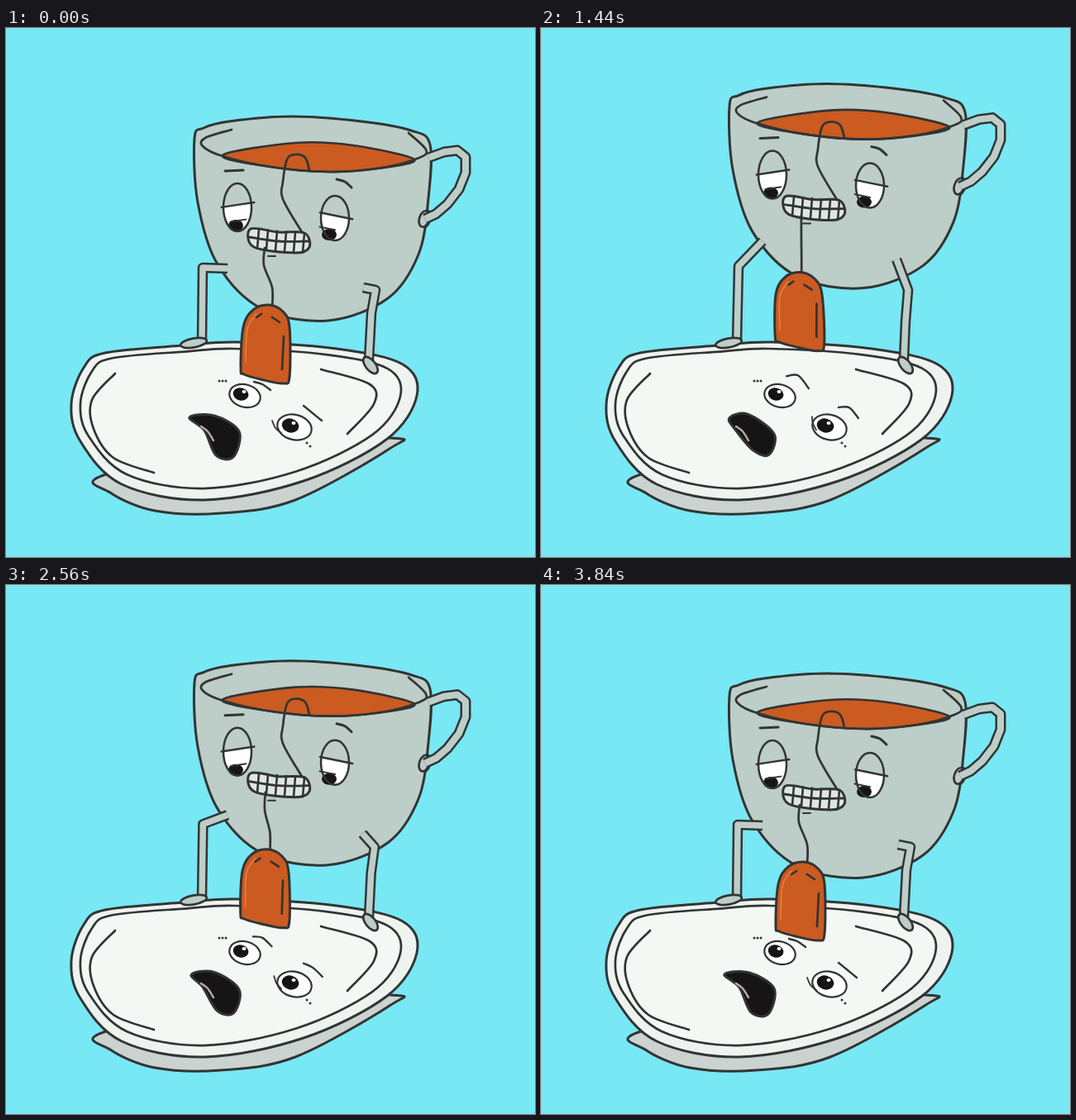
An HTML page with a canvas that plays this animation: 640 px wide and 640 px high, repeating every 3880 ms.

```html
<!DOCTYPE html>
<html lang="en">
<head>
<meta charset="utf-8">
<title>Tea time</title>
<style>
  html, body { margin: 0; width: 100%; height: 100%; overflow: hidden; background: #78e8f4; }
  canvas { display: block; width: 100vmin; height: 100vmin; }
</style>
</head>
<body>
<canvas id="stage" width="640" height="640"></canvas>
<script>
const ctx = document.getElementById('stage').getContext('2d');
const LOOP = 3880, STEP = 40, FALL_AT = 1960, TRAVEL = 1920, HEIGHT = 40.5;
const SKY = '#78e8f4', INK = '#323434', CUP = '#bdcdc7', TEA = '#cb5b20',
      CHINA = '#f4f8f5', SIDE = '#cbd3d0', BLACK = '#161415';

let lift = 0; // 0 = dipped, 1 = raised

const parse = s => s.split(' ').map(p => p.split(',').map(Number));
const mix = (a, b) => a + (b - a) * lift;

// Blend the key points of a dipped and a raised shape.
const pose = (low, high) => {
  const top = parse(high);
  return parse(low).map(([x, y], i) => [mix(x, top[i][0]), mix(y, top[i][1])]);
};

// Smooth curve through a few key points.
function trace(shape, closed) {
  const p = typeof shape === 'string' ? parse(shape) : shape, n = p.length;
  const at = i => closed ? p[(i + n) % n] : p[Math.max(0, Math.min(n - 1, i))];
  ctx.beginPath();
  ctx.moveTo(...p[0]);
  for (let i = 0; i < (closed ? n : n - 1); i++) {
    const [a, b, c, d] = [at(i - 1), at(i), at(i + 1), at(i + 2)];
    ctx.bezierCurveTo(b[0] + (c[0] - a[0]) / 6, b[1] + (c[1] - a[1]) / 6,
                      c[0] - (d[0] - b[0]) / 6, c[1] - (d[1] - b[1]) / 6, ...c);
  }
  if (closed) ctx.closePath();
}

function paint(fill, width = 3, color = INK) {
  ctx.fillStyle = fill;
  ctx.fill();
  if (width) ink(width, color);
}

function ink(width = 2.7, color = INK) {
  ctx.lineWidth = width;
  ctx.strokeStyle = color;
  ctx.stroke();
}

function line(shape, width, color) {
  trace(shape);
  ink(width, color);
}

function blob(shape, fill, width) {
  trace(shape, true);
  paint(fill, width);
}

function oval(x, y, rx, ry, fill, turn = 0, width = 0) {
  ctx.beginPath();
  ctx.ellipse(x, y, rx, ry, turn, 0, Math.PI * 2);
  paint(fill, width);
}

// Outlined limb with open ends.
function tube(points, width) {
  ctx.beginPath();
  points.forEach(p => ctx.lineTo(...p));
  ctx.lineCap = 'butt';
  ink(width + 5);
  ink(width, CUP);
  ctx.lineCap = 'round';
}

function saucer() {
  blob('118,541 126,562 180,584 260,587 350,571 464,509 465,496 300,500', SIDE);
  const rim = parse('79,455 94,411 120,393 215,384 280,380 400,388 480,407 497,445 460,498 360,548 240,571 140,552 90,500');
  blob(rim, '#eef3f0');
  blob(rim.map(([x, y]) => [90 + (x - 79) * .926, 388 + (y - 380) * .885]), CHINA, 2.7);
  line('132,418 104,450 106,485 130,520 179,538');
  line('381,413 440,431 445,455 413,491');
}

function wideEye(x, y, r) {
  oval(x, y, r, r * .72, '#fff', .25, 2.2);
  oval(x - 5, y - 2, r * .5, r * .4, BLACK, .3);
  oval(x - 1, y - 5, 2.5, 2, '#fff');
}

function saucerFace() {
  wideEye(289, 445, 19);
  wideEye(349, 483, 21);
  line(pose('300,428 310,431 320,438', '297,421 311,420 324,436'), 2.4);
  line(pose('360,457 371,466 382,475', '360,459 373,459 384,472'), 2.4);
  line(pose('322,475 326,484 333,490', '328,470 329,478 333,486'), 1.8);
  for (const x of [258, 262, 266]) oval(x, 425 + x % 4, 1.5, 1.5, INK);
  for (const x of [364, 368]) oval(x, x + 138, 1.5, 1.5, INK);

  blob(pose('222,471 252,469 282,488 275,519 254,517 240,487',
            '228,472 250,467 282,491 276,516 257,511 235,486'), BLACK);
  line('236,482 244,488 251,499', 2.5, '#b9a9a1');
}

function cup() {
  oval(506, 230, 7, 11, CUP, .3, 3);
  blob('228,133 239,120 270,112 345,106 430,112 490,123 513,140 511,205 499,273 462,326 390,353 310,339 256,285 232,210', CUP);
  blob('262,153 350,138 420,141 494,158 450,169 390,173 320,167', TEA, 2.7);
  line('273,122 241,132 238,142 262,154 320,167 390,173 455,168 500,156 508,146 487,126');
  oval(506, 230, 6, 10, CUP, .3, 2.7);
  tube(parse('511,156 530,149 546,147 556,155 556,174 548,194 534,212 520,224 507,230'), 8);
}

function sleepyEye(x, y, ry, tilt, pupilX) {
  const rx = 17;
  ctx.save();
  ctx.translate(x, y);
  oval(0, 0, rx, ry, CUP);
  ctx.save();
  ctx.clip();
  ctx.rotate(tilt);
  ctx.fillStyle = '#fff';
  ctx.fillRect(-30, -3, 60, 50);
  ctx.restore();
  oval(pupilX, ry - 7, 9, 7, BLACK);
  oval(0, 0, rx, ry, 'transparent', 0, 2.5);
  ctx.rotate(tilt);
  line([[-rx - 2, -3], [rx + 4, -3]], 2.5);
  line([[pupilX - 9, ry - 13], [pupilX + 10, ry - 13]], 2);
  ctx.restore();
}

function cupFace() {
  line('265,172 287,171', 3);
  line('400,182 410,185 418,192', 3);
  sleepyEye(280, 216, 29, -.15, -2);
  sleepyEye(398, 229, 27, .2, -7);
  line('367,171 362,156 350,152 340,158 335,185 335,206 358,246');

  blob('296,242 330,246 361,247 367,264 350,271 300,264', '#dfe6e2');
  line('295,252 330,257 366,257', 2.8);
  for (let x = 305; x < 365; x += 11) {
    const y = 242 + (x - 300) / 11;
    line([[x + 1, y], [x - 1, y + 23]], 2.6);
  }
  line('317,275 326,275', 2);
}

function legs() {
  tube(pose('237,378 238,290 268,291', '237,378 239,288 268,257'), 7.5);
  oval(227, 381, 16, 5.5, CUP, -.18, 2.7);
  tube(pose('439,402 442,345 447,317 432,314', '439,402 441,355 444,317 430,279'), 7.5);
  oval(441, 408, 12, 6, CUP, .9, 2.7);
}

function teaBag() {
  line(pose('313,266 312,287 322,314 322,338', '315,226 315,250 315,275 315,298'));
  ctx.save();
  const skew = .045 * lift;
  ctx.transform(1, 0, skew, 1, -430 * skew, -HEIGHT * lift);
  blob('284,412 287,362 299,341 318,335 335,343 343,362 343,422 335,430 308,425 288,419', TEA);
  line('290,405 292,364 303,346', 1.5, '#e58246');
  line('336,373 334,413');
  line('303,350 309,346');
  line('322,350 331,356');
  ctx.restore();
}

function draw(now) {
  const t = Math.floor(now % LOOP / STEP) * STEP;
  const remains = start => Math.max(0, 1 - (t - start) / TRAVEL) ** 2.6;
  lift = t < FALL_AT ? 1 - remains(0) : remains(FALL_AT);

  ctx.fillStyle = SKY;
  ctx.fillRect(0, 0, 640, 640);
  ctx.lineCap = ctx.lineJoin = 'round';
  saucer();
  saucerFace();
  ctx.save();
  ctx.translate(0, 1 - HEIGHT * lift);
  cup();
  cupFace();
  ctx.restore();
  legs();
  teaBag();
  requestAnimationFrame(draw);
}
requestAnimationFrame(draw);
</script>
</body>
</html>
```
